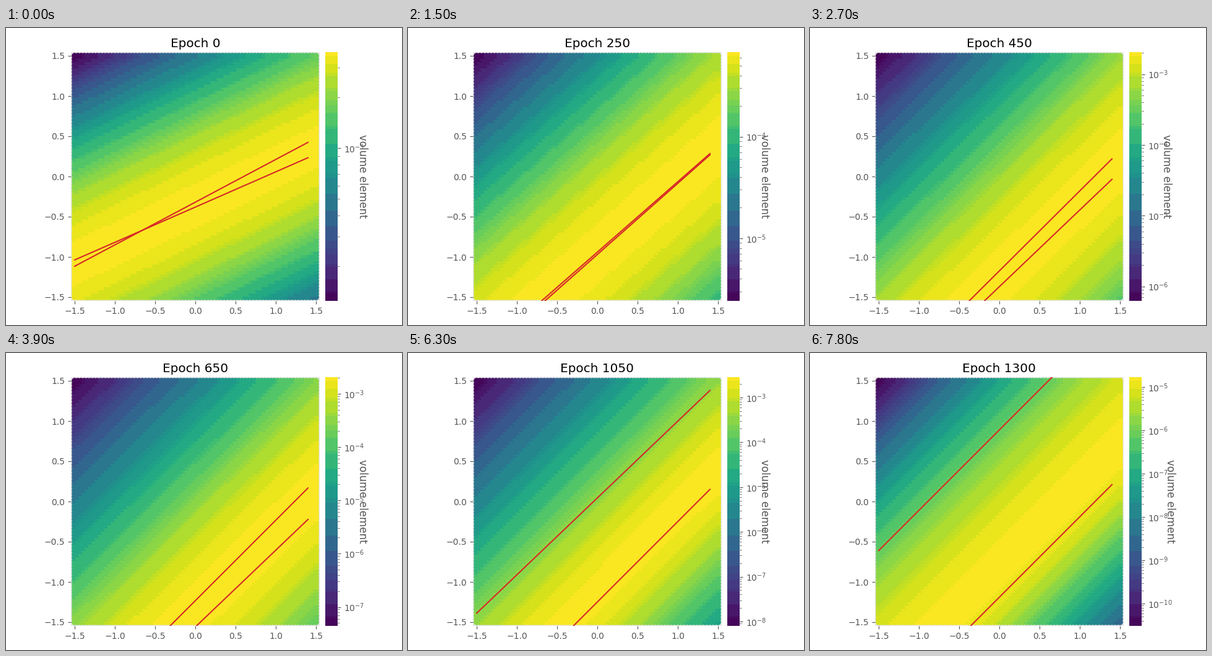
Recreate the animation shown at these times as a matplotlib script. Size 640 by 480 pixels, loop 8 s.

```python
import matplotlib.pyplot as plt
import numpy as np
from matplotlib.animation import FuncAnimation
from matplotlib.colors import ListedColormap, LogNorm

GRAY = "#555555"
plt.rcParams.update({
    "font.family": "DejaVu Sans", "font.size": 10,
    "axes.facecolor": "#E5E5E5", "axes.labelcolor": GRAY,
    "axes.labelsize": "large", "axes.titlesize": "x-large",
    "xtick.color": GRAY, "ytick.color": GRAY,
})

WIDTH, HEIGHT, DPI = 640, 480, 100
INTERVAL, FRAMES, FRAMES_PER_STEP, EPOCHS_PER_STEP = 100, 80, 3, 50
PLOT_SIZE, PIXELS_PER_UNIT = 401.6, 130

KEY_EPOCHS = np.array([0, 250, 450, 650, 850, 1050, 1300])
OFFSET_B = np.array([-0.38, -0.94, -1.37, -1.56, -1.167, 0.044, 0.89])
LOG_PEAK = np.array([-2.43, -3.17, -2.69, -2.69, -2.50, -2.55, -4.77])


def hermite(epoch, values):
    """Smooth curve through the values at the key epochs."""
    tangents = np.gradient(values, KEY_EPOCHS)
    i = min(np.searchsorted(KEY_EPOCHS, epoch, side="right") - 1, len(KEY_EPOCHS) - 2)
    span = KEY_EPOCHS[i + 1] - KEY_EPOCHS[i]
    t = (epoch - KEY_EPOCHS[i]) / span
    return ((1 + 2 * t) * (1 - t) ** 2 * values[i]
            + t * (1 - t) ** 2 * span * tangents[i]
            + t * t * (3 - 2 * t) * values[i + 1]
            + t * t * (t - 1) * span * tangents[i + 1])


def ease(epoch, start, end):
    t = np.clip((epoch - start) / (end - start), 0, 1)
    return t * t * (3 - 2 * t)


def decay(epoch, scale, power):
    return np.exp(-(epoch / scale) ** power)


def sigmoid_units(epoch):
    """Slope, offset and steepness of the two hidden units."""
    late = ease(epoch, 1050, 1300)
    unit_a = (1 - 0.469 * decay(epoch, 211, 2),
              -1.25 + 0.931 * decay(epoch, 216, 1.25) + 0.06 * late,
              1.12 + 2.28 * ease(epoch, 250, 1350))
    unit_b = (0.955 - 0.517 * decay(epoch, 183, 2) + 0.045 * late,
              hermite(epoch, OFFSET_B),
              1.2 - 0.12 * np.sin(2 * np.pi * epoch / 800) + 0.75 * late)
    return unit_a, unit_b


def volume_element(epoch, units):
    log_v = 0
    for slope, offset, steepness in units:
        z = steepness * (grid_y - slope * grid_x - offset)
        log_v = log_v - 2 * np.log(np.cosh(z / 2))
    return 10 ** hermite(epoch, LOG_PEAK) * np.exp(log_v - log_v.max())


def banded_viridis():
    """Viridis with similar colours merged into flat bands."""
    colors = plt.get_cmap("viridis")(np.arange(256))[:, :3]
    cells = (colors * 255).round().astype(int) // [32, 16, 32]
    _, group = np.unique(cells, axis=0, return_inverse=True)
    group = group.ravel()
    return ListedColormap([colors[group == g].mean(axis=0) for g in group])


def add_axes(left, width):
    bottom = (HEIGHT - PLOT_SIZE) / 2
    axes = fig.add_axes([left / WIDTH, bottom / HEIGHT, width / WIDTH, PLOT_SIZE / HEIGHT])
    axes.spines[:].set_visible(False)
    return axes


axis = np.linspace(-1.5, 1.5, 76)
grid_x, grid_y = (g.ravel() for g in np.meshgrid(axis, axis))
line_x = np.linspace(-1.5, 1.4, 30)

fig = plt.figure(figsize=(WIDTH / DPI, HEIGHT / DPI), dpi=DPI, facecolor="white")
ax = add_axes(306 - PLOT_SIZE / 2, PLOT_SIZE)
limit = PLOT_SIZE / PIXELS_PER_UNIT / 2
ax.set(xlim=(-limit, limit), ylim=(-limit, limit))
ticks = np.arange(-1.5, 1.6, 0.5)
ax.set_xticks(ticks)
ax.set_yticks(ticks)

norm = LogNorm(1e-4, 1e-2)
dots = ax.scatter(grid_x, grid_y, c=np.full(grid_x.size, 1e-3), cmap=banded_viridis(), norm=norm)
lines = [ax.plot(line_x, line_x, color="tab:red", linewidth=1.5)[0] for _ in range(2)]
title = ax.set_title("")
colorbar = fig.colorbar(dots, cax=add_axes(516, 20))
colorbar.outline.set_visible(False)
colorbar.set_label("volume element", rotation=270)


def update(frame):
    epoch = frame // FRAMES_PER_STEP * EPOCHS_PER_STEP
    units = sigmoid_units(epoch)
    volume = volume_element(epoch, units)
    dots.set_array(volume)
    norm.vmin, norm.vmax = volume.min(), volume.max()
    for line, (slope, offset, _) in zip(lines, units):
        line.set_ydata(slope * line_x + offset)
    title.set_text(f"Epoch {epoch}")
    return [dots, title, *lines]


animation = FuncAnimation(fig, update, frames=FRAMES, interval=INTERVAL,
                          repeat=True, repeat_delay=0, blit=False)
plt.show()
```
